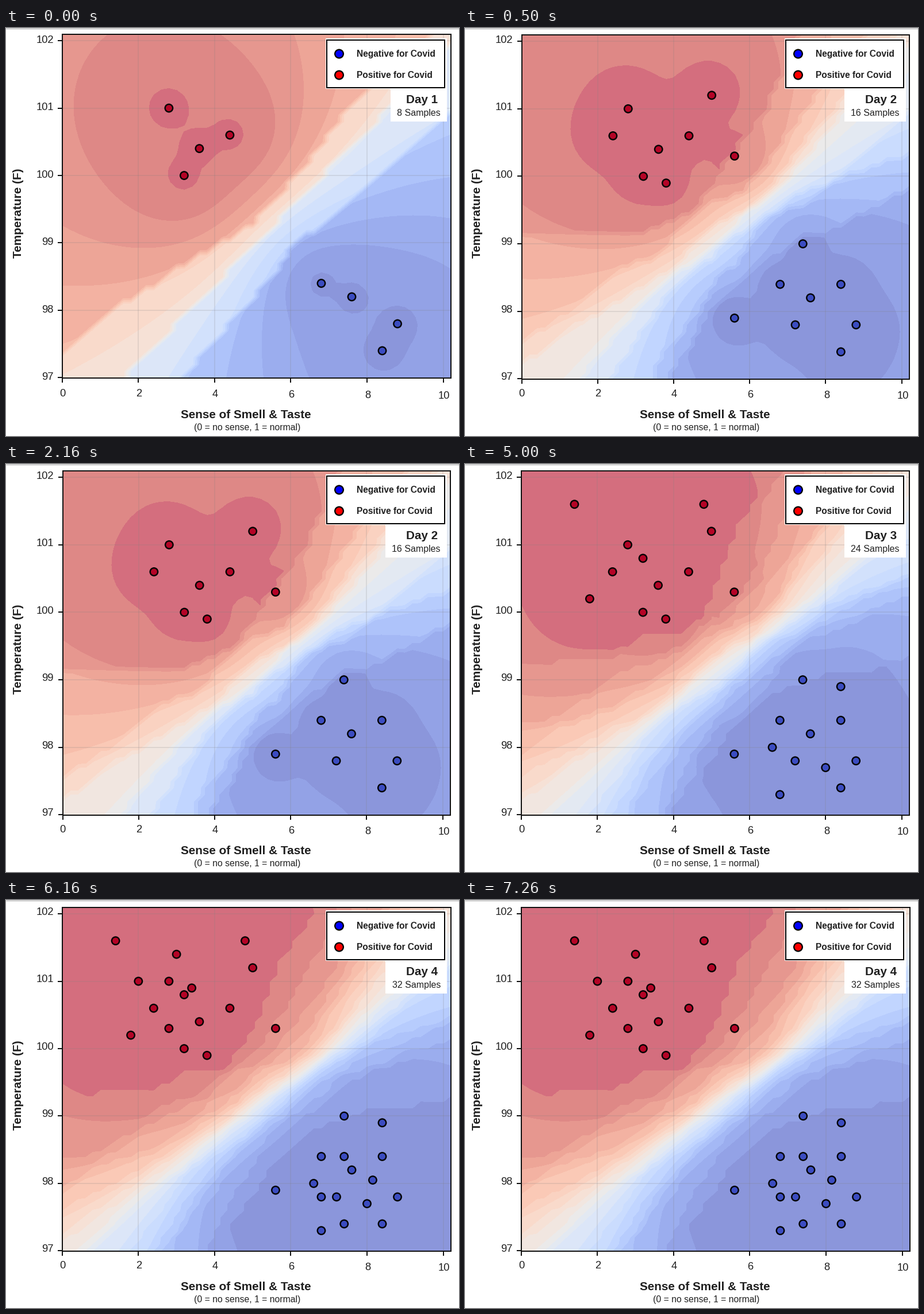
A matplotlib script for the animation above (8 s loop, 788 by 711 pixels).

```python
import numpy as np
import matplotlib
import matplotlib.pyplot as plt
from matplotlib.animation import FuncAnimation
from matplotlib.patches import Circle, Rectangle

W, H, DPI = 788, 711, 100
STEP, LOOP = 20, 8000
CHANGES = (500, 3260, 6160)
PT = 72 / DPI  # points per pixel
INK = "#202020"
BLACK = "#111111"
COOLWARM = matplotlib.colormaps["coolwarm"]

plt.rcParams["font.family"] = "Liberation Sans"
fig = plt.figure(figsize=(W / DPI, H / DPI), dpi=DPI, facecolor="white")
ax = fig.add_axes([0, 0, 1, 1])
ax.set_xlim(0, W)
ax.set_ylim(H, 0)
ax.axis("off")

# Samples as (sense, temperature); each day adds four of each kind.
POSITIVE = np.array([
    (2.8, 101), (4.4, 100.6), (3.6, 100.4), (3.2, 100),
    (2.4, 100.6), (5, 101.2), (5.6, 100.3), (3.8, 99.9),
    (1.4, 101.6), (4.8, 101.6), (3.2, 100.8), (1.8, 100.2),
    (3, 101.4), (2, 101), (3.4, 100.9), (2.8, 100.3)])
NEGATIVE = np.array([
    (6.8, 98.4), (7.6, 98.2), (8.8, 97.8), (8.4, 97.4),
    (7.4, 99), (8.4, 98.4), (5.6, 97.9), (7.2, 97.8),
    (8.4, 98.9), (6.6, 98), (8, 97.7), (6.8, 97.3),
    (7.4, 98.4), (8.15, 98.05), (6.8, 97.8), (7.4, 97.4)])

# Plot area of each day: left, top, right, bottom
BOXES = [(98, 10, 774, 609), (99, 11, 773, 611),
         (98, 11, 773, 611), (98, 12, 774, 611)]

SENSE, TEMP = np.meshgrid(np.linspace(0, 10.2, 52), np.linspace(97, 102.1, 52))
BANDS = np.arange(-11, 12)
EDGES = 0.5 + 0.0469 * np.arange(-11.5, 12)


def tint(t):
    """Colour map value at 60% over white."""
    return tuple(0.6 * c + 0.4 for c in COOLWARM(float(t))[:3])


def chance(day):
    """Chance of a positive: neighbour vote averaged with distance weighting."""
    n = 4 * day
    pts = np.vstack([POSITIVE[:n], NEGATIVE[:n]])
    sick = np.repeat([1.0, 0.0], n)
    dx = 66.2 * (SENSE - pts[:, 0, None, None])
    dy = 117.6 * (TEMP - pts[:, 1, None, None])
    r2 = dx ** 2 + dy ** 2 + 1
    nearest = np.argsort(r2, axis=0)[:n - 1]
    vote = sick[nearest].mean(axis=0)
    weight = r2 ** (-(day + 1) / 2)
    near = weight[:n].sum(axis=0) / weight.sum(axis=0)
    return (vote + near) / 2


def label(x, y, s, px, ha="center", va="baseline", **kw):
    return ax.text(x, y, s, fontsize=px * PT, ha=ha, va=va, color=INK,
                   zorder=9, **kw)


def line(xs, ys, color=BLACK, width=2, z=4, alpha=1):
    return ax.add_line(plt.Line2D(xs, ys, color=color, lw=width * PT, zorder=z,
                                  alpha=alpha, solid_capstyle="butt"))


def dot(x, y, r, color, z):
    return ax.add_patch(Circle((x, y), r, fc=color, ec="black", lw=2.4 * PT,
                               zorder=z))


def grid_line(xs, ys):
    return line(xs, ys, "#808080", 2, 3, 0.17)


def make_day(day):
    """All artists that belong to one day."""
    left, top, right, bottom = BOXES[day - 1]
    sx, sy = (right - left) / 10.2, (bottom - top) / 5.1

    def px(sense):
        return left - 0.2 + sx * sense

    def py(temp):
        return bottom + 0.4 - sy * (temp - 97)

    art = [ax.contourf(px(SENSE), py(TEMP), chance(day), levels=EDGES,
                       colors=[tint(0.5 + 0.0445 * b) for b in BANDS], zorder=1)]
    for v in range(0, 11, 2):
        x = px(v)
        art.append(line([x, x], [bottom, bottom + 8.5]))
        if v:
            art.append(grid_line([x, x], [top, bottom]))
    for v in range(97, 103):
        y = py(v)
        art.append(line([left - 7.5, left], [y, y]))
        if v > 97:
            art.append(grid_line([left, right], [y, y]))
    art.append(ax.add_patch(Rectangle(
        (left + 0.5, top + 0.5), right - left, bottom - top, fill=False,
        ec=BLACK, lw=2 * PT, zorder=4)))
    for pts, t in ((POSITIVE, 1.0), (NEGATIVE, 0.0)):
        for sense, temp in pts[:4 * day]:
            art.append(dot(px(sense), py(temp), 6.7, COOLWARM(t), 5))

    count = f"{8 * day} Samples"
    edge = 669 if len(count) < 10 else 660
    art.append(ax.add_patch(Rectangle((edge, 100), 767 - edge, 63, fc="white",
                                      lw=0, zorder=6)))
    art.append(label(751, 131, f"Day {day}", 20.6, ha="right", weight="bold"))
    art.append(label(756, 153, count, 16, ha="right"))
    return art


def draw_static():
    line([0, W], [0.5, 0.5], "#999999", 1)
    for v in range(0, 11, 2):
        label(98 + 66.4 * v, 637 + 0.45 * v, str(v), 18.4, va="center")
    for v in range(6):
        label(83, 608.5 - 117.4 * v, str(97 + v), 18.4, ha="right", va="center")
    label(417.5, 679.5, "Sense of Smell & Taste", 20.8, weight="bold")
    label(420, 701, "(0 = no sense, 1 = normal)", 15.7)
    label(27, 322.5, "Temperature (F)", 20.8, weight="bold", rotation=90,
          rotation_mode="anchor")
    ax.add_patch(Rectangle((556, 18), 211, 88, fc="white", lw=0, zorder=7))
    ax.add_patch(Rectangle((558.5, 20.5), 205, 83, fc="white", ec="black",
                           lw=2 * PT, zorder=8))
    for y, color, name in ((45, "#0000ff", "Negative"), (82, "#ff0000", "Positive")):
        dot(579.5, y, 7.3, color, 9)
        label(610, y + 5, f"{name} for Covid", 15.5, ha="left", weight="bold")


draw_static()
days = [make_day(d) for d in (1, 2, 3, 4)]


def update(i):
    now = np.searchsorted(CHANGES, i * STEP, side="right")
    for k, art in enumerate(days):
        for a in art:
            a.set_visible(k == now)
    return []


anim = FuncAnimation(fig, update, frames=LOOP // STEP, interval=STEP,
                     repeat=True, repeat_delay=0, cache_frame_data=False)
plt.show()
```
